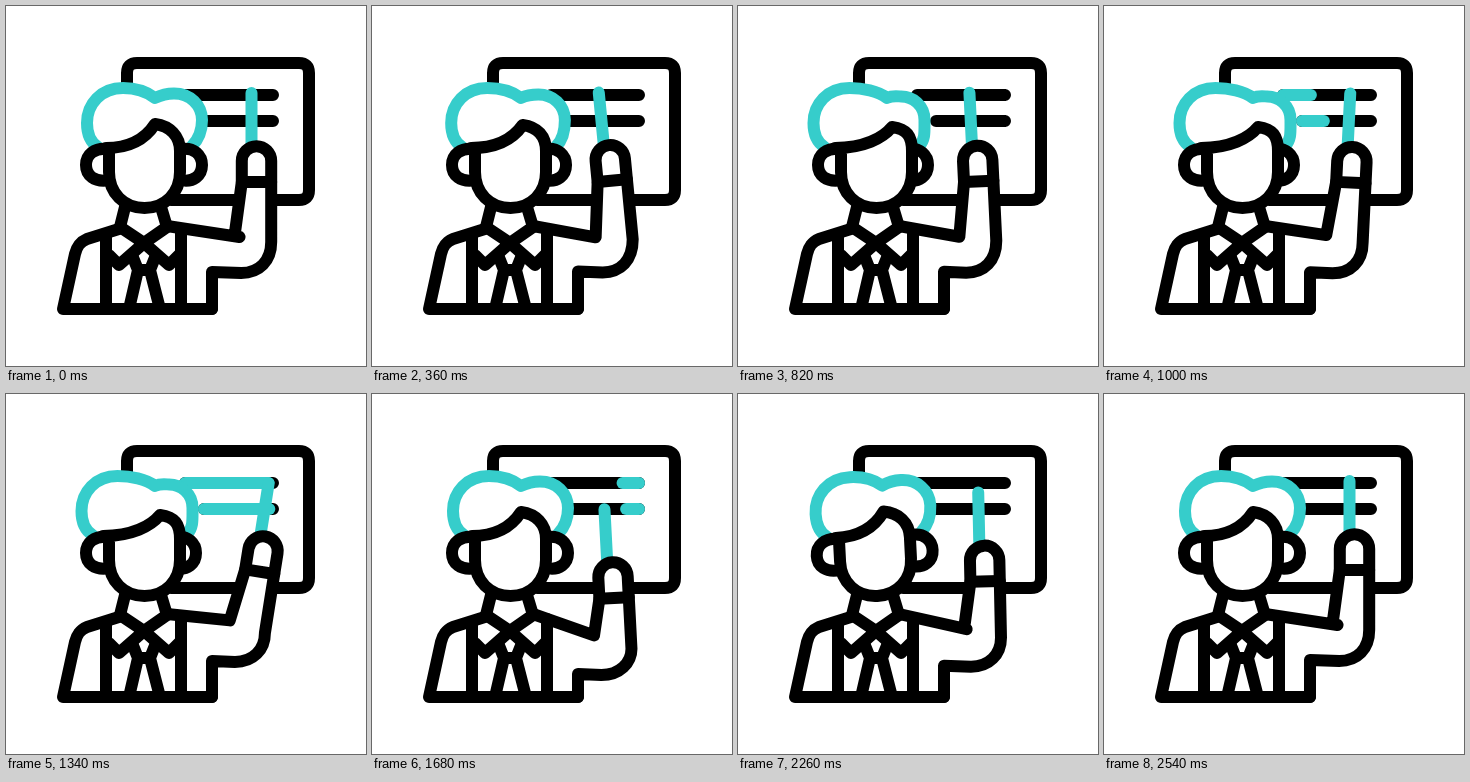
Recreate the animation shown at these times as an HTML page. Size 360x360 px, loop 2800 ms.

```html
<!DOCTYPE html>
<html lang="en">
<head>
<meta charset="utf-8">
<title>Teacher at the board</title>
<style>
  html, body { margin: 0; width: 100%; height: 100%; overflow: hidden; background: #fff; }
  svg { display: block; width: 100vw; height: 100vh; }
  path, line { fill: none; stroke: #000; stroke-width: 12; stroke-linecap: round; stroke-linejoin: round; }
  .solid { fill: #fff; }
  .teal { stroke: #36cdcb; }
</style>
</head>
<body>
<svg viewBox="0 0 360 360">
  <path d="M121 100V67Q121 57 131 57H293Q303 57 303 67V184Q303 194 293 194H165"/>
  <path d="M179 89H267M198 115H267"/>
  <line class="teal" id="mark1"/>
  <line class="teal" id="mark2"/>
  <line class="teal" id="stick"/>
  <path class="solid" id="arm"/>
  <path id="cuff"/>
  <path d="M57 303L69 248C71 240 74 236 81 233L116 222M57 303H206M100 232V303M175 225V303"/>
  <path d="M119 201L114 221L138 237L113 259L103 249M155 201L161 221L138 237L163 259L173 249"/>
  <path d="M126 249L132 264H144L150 249M132 264L123 303M144 264L154 303"/>
  <g id="head">
    <path class="solid teal" id="hair"/>
    <path class="solid" d="M103 143C88 141 80 149 80 159C80 169 88 177 104 174"/>
    <path class="solid" id="ear" d="M175 143C188 141 196 149 196 159C196 169 188 177 174 174"/>
    <path class="solid" id="face"/>
  </g>
</svg>
<script>
const LOOP = 2800;
const $ = id => document.getElementById(id);

const ramp = (t, from, to) => Math.max(0, Math.min(1, (t - from) / (to - from)));
const ease = u => u * u * (3 - 2 * u);
// rises from a to b, holds, falls from c to d
const pulse = (t, a, b, c, d) => ease(ramp(t, a, b)) - ease(ramp(t, c, d));

// hand x, y and angle at rest, and the offsets of each gesture
const REST = [250.5, 155, 0];
const LEFT = [-20, -2, -9], RIGHT = [6.5, 2, 9], LOW = [-9.5, 28, -3];

function setLine(id, x1, y1, x2, y2) {
  for (const [k, v] of Object.entries({ x1, y1, x2, y2 })) $(id).setAttribute(k, v);
}

function drawArm(t) {
  const left = pulse(t, 200, 480, 480, 1340);
  const right = pulse(t, 480, 1340, 1340, 1680);
  const low = pulse(t, 1340, 1680, 1900, 2540);
  const [hx, hy, angle] = REST.map((v, i) => v + LEFT[i] * left + RIGHT[i] * right + LOW[i] * low);
  const r = angle * Math.PI / 180, c = Math.cos(r), s = Math.sin(r);
  const at = (x, y) => [hx + x * c - y * s, hy + x * s + y * c];

  // the elbow and sleeve follow the hand only partly when it sinks
  const drop = hy - REST[1], bottom = 267 + drop / 2;
  const [ex, ey] = at(-22, 75 - drop * 0.63);
  const [ox, oy] = at(14.7, 81 - drop * 0.3);
  const overhang = Math.max(0, 5 - 2 * Math.abs(angle));
  const cuff = [at(-14.7, 21), at(14.7, 21)];

  $("arm").setAttribute("d",
    `M161 220L${ex + overhang} ${ey + overhang / 5}L${ex} ${ey}L${cuff[0]}L${at(-14.7, 0)}` +
    `A14.7 14.7 0 0 1 ${at(14.7, 0)}L${cuff[1]}L${ox} ${oy}` +
    `C${ox} ${bottom - 12} ${ox - 12} ${bottom} ${ox - 30} ${bottom}L206 ${bottom - 1}V303`);
  $("cuff").setAttribute("d", `M${cuff[0]}L${cuff[1]}`);
  setLine("stick", ...at(-5, -68), ...at(-5, -15));
}

function drawMark(id, x, y, t) {
  const end = ramp(t, 830, 1370), start = ramp(t, 1380, 1750), len = 267 - x;
  $(id).style.display = end > start ? "" : "none";
  setLine(id, x + len * start, y, x + len * end, y);
}

// turning slides the hair and far ear left and the fringe right
function drawHead(t) {
  const turn = pulse(t, 200, 620, 1340, 1680);
  const tilt = -6.3 * pulse(t, 1680, 2020, 2020, 2480);
  const back = -5.5 * turn, side = -9.5 * turn, peak = 5 * turn, sink = 3 * turn;
  $("hair").setAttribute("d",
    `M${92 + back} 141C${84 + back} 136 ${81 + back} 127 ${81 + back} 117` +
    `C${81 + back} 98 ${95 + back} 82 ${117 + back} 82C${130 + back} 82 140 85 149 92` +
    `C155 89 161 ${87.5 + sink} ${168 + side / 2} ${87.5 + sink}` +
    `C${184 + side} ${87.5 + sink} ${196 + side} 99 ${196 + side} 114` +
    `C${196 + side} 126 ${192 + side / 2} 134 ${186 + side / 2} 140`);
  $("ear").setAttribute("transform", `translate(${-6 * turn})`);
  $("face").setAttribute("d",
    "M103 143V166C103 187 118 202 138.5 202C159 202 174 187 174 166V145" +
    `C174 130 ${164 + peak} ${120 + sink} ${149 + peak} ${118 + sink}` +
    `C${140 + peak} 132 126 142 ${100 - sink} 142`);
  $("head").setAttribute("transform", `rotate(${tilt} 138 185)`);
}

const began = performance.now();
function draw() {
  const t = (performance.now() - began) % LOOP;
  drawArm(t);
  drawMark("mark1", 179, 89, t);
  drawMark("mark2", 198, 115, t);
  drawHead(t);
  requestAnimationFrame(draw);
}
draw();
</script>
</body>
</html>
```
